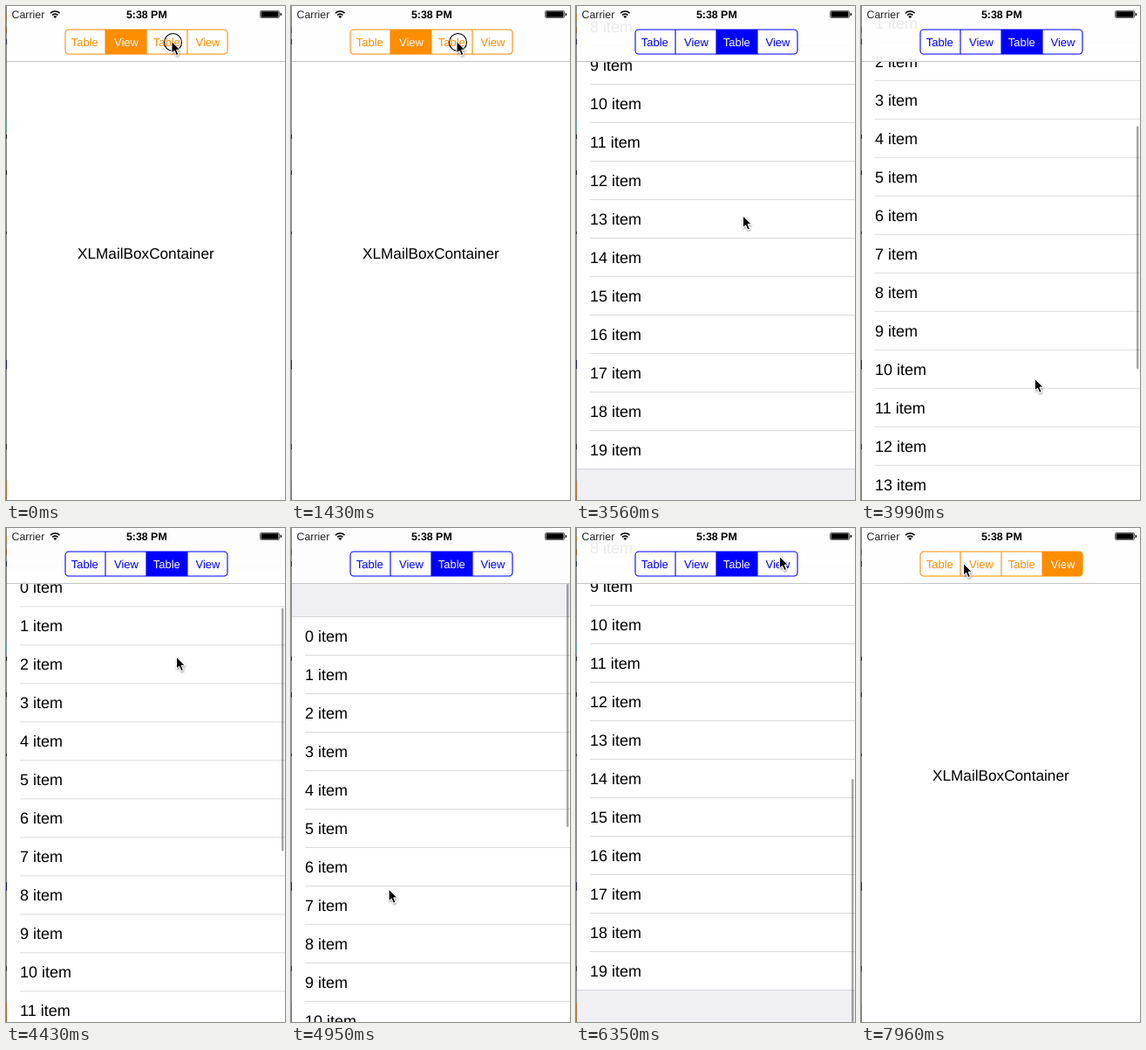
An HTML page for the animation above (8 s loop, 320 px wide and 565 px high).

```html
<!DOCTYPE html>
<html lang="en">
<head>
<meta charset="utf-8">
<title>Mailbox container</title>
<style>
  html, body { margin: 0; width: 100%; height: 100%; overflow: hidden; background: #fff; }
  svg { display: block; width: 100%; height: 100%; }
  text { font-family: "Liberation Sans", Arial, sans-serif; text-rendering: geometricPrecision; }
  .label { font-size: 17.2px; }
  .row { font-size: 18px; }
  .seg { font-size: 13px; text-anchor: middle; }
  .status { font-size: 12.4px; }
</style>
</head>
<body>
<svg viewBox="0 0 320 565">
  <defs>
    <clipPath id="phone"><rect x="1" width="319" height="565"/></clipPath>
    <clipPath id="pill"><rect x="68" y="27" width="186" height="28" rx="4"/></clipPath>
    <filter id="soft" x="-50%" y="-50%" width="220%" height="220%">
      <feDropShadow dx="0.5" dy="1.5" stdDeviation="1" flood-opacity=".4"/>
    </filter>
  </defs>

  <g id="edge"><rect width="1" height="565" fill="#868686"/></g>

  <g clip-path="url(#phone)">
    <rect x="1" width="319" height="565" fill="#fff"/>
    <g id="pages">
      <text class="label" x="82" y="289">XLMailBoxContainer</text>
      <g transform="translate(320 0)">
        <rect x="1" width="319" height="565" fill="#efeff4"/>
        <g id="rows"></g>
        <rect id="bar" x="316" width="2.5" height="278" rx="1.25" fill="#000"/>
      </g>
      <g transform="translate(640 0)">
        <rect x="1" width="319" height="565" fill="#fff"/>
        <text class="label" x="82" y="289">XLMailBoxContainer</text>
      </g>
    </g>

    <rect x="1" width="319" height="63" fill="#fefefe" fill-opacity=".92"/>
    <rect x="1" y="63" width="319" height="1" fill="#c4c4c4"/>
    <g id="tabs"></g>

    <text class="status" x="6.5" y="14" fill="#222">Carrier</text>
    <g fill="none" stroke="#000" stroke-width="1.6">
      <path d="M51 8.2a7.4 7.4 0 0 1 10.6 0M53.1 10.5a4.5 4.5 0 0 1 6.4 0"/>
      <path d="M56.3 14.1l-2-2a2.8 2.8 0 0 1 4 0z" fill="#000" stroke="none"/>
    </g>
    <text class="status" x="161.3" y="14" font-weight="700" text-anchor="middle">5:38 PM</text>
    <rect x="291.5" y="5.5" width="22" height="8" rx="1.5" fill="none" stroke="#000" stroke-width=".6"/>
    <rect x="292.5" y="6.3" width="20" height="6.4" rx=".8"/>
    <path d="M314.6 7.6q1.6.4 1.6 1.9t-1.6 1.9z"/>
  </g>

  <g id="pointer">
    <circle id="press" cx="1.5" cy="1" r="10" fill="none" stroke="#000" stroke-width="1.1"/>
    <path d="M0 0V13.6L3.1 10.7 5.4 16 7.9 14.9 5.6 9.7H9.8Z" stroke="#fff" stroke-width="1" filter="url(#soft)"/>
  </g>
</svg>

<script>
const LOOP = 8000;
const ORANGE = '#ff8d00', BLUE = '#0000ff';
const $ = id => document.getElementById(id);

function add(parent, tag, attrs, text) {
  const el = document.createElementNS('http://www.w3.org/2000/svg', tag);
  for (const k in attrs) el.setAttribute(k, attrs[k]);
  if (text) el.textContent = text;
  parent.appendChild(el);
  return el;
}

// Sliver of the desktop left of the phone: y, height, colour
[[9, 8, '#a8783c'], [24, 7, '#8a5a2a'], [38, 6, '#22227a'], [130, 12, '#6f9a9a'], [147, 5, '#222'],
 [188, 5, '#222'], [258, 3, '#333'], [405, 10, '#1c1c80'], [501, 6, '#333'], [543, 22, '#a86a2a']]
  .forEach(([y, height, fill]) => add($('edge'), 'rect', { y, width: 1, height, fill }));

// Table content, first row at y = 0
const rows = $('rows');
add(rows, 'rect', { x: 1, width: 319, height: 880, fill: '#fff' });
for (let i = 0; i < 20; i++) {
  add(rows, 'text', { class: 'row', x: 16, y: i * 44 + 28 }, i + ' item');
  if (i < 19) add(rows, 'rect', { x: 16, y: i * 44 + 43, width: 304, height: 1, fill: '#dbdbde' });
}
[-1, 879].forEach(y => add(rows, 'rect', { x: 1, y, width: 319, height: 1, fill: '#d6d6da' }));

// Segmented control
const edges = [68, 114, 161, 208, 254];
const tabs = $('tabs');
const fills = add(tabs, 'g', { 'clip-path': 'url(#pill)' });
const segs = ['Table', 'View', 'Table', 'View'].map((name, i) => ({
  fill: add(fills, 'rect', { x: edges[i], y: 27, width: edges[i + 1] - edges[i], height: 28 }),
  text: add(tabs, 'text', { class: 'seg', x: [90.3, 138, 184.3, 231.5][i], y: 45.5 }, name)
}));
const frame = add(tabs, 'path', {
  d: 'M72 27H250a4 4 0 0 1 4 4V51a4 4 0 0 1-4 4H72a4 4 0 0 1-4-4V31a4 4 0 0 1 4-4zM114 27V55M161 27V55M208 27V55',
  fill: 'none', 'stroke-width': 1.1
});

const out = p => 1 - (1 - p) ** 2;
const inOut = p => p * p * (3 - 2 * p);

// Each step: time, value or values, easing towards it
const scroll = [[2040, 0], [2250, 235], [2480, 452, out], [3600, 452], [3850, 217], [4430, 56, out],
  [4750, 0, out], [5100, 0], [5400, 235], [5570, 312], [6200, 452, out], [6350, 453], [6480, 452]];
const barAlpha = [[2040, 0], [2060, 1], [2700, 1], [3010, 0], [3600, 0], [3640, 1], [6620, 1], [6860, 0]];
const page = [[1660, 0], [1980, 1, inOut], [6850, 1], [7150, 2, inOut]];
const pointer = [[1690, [190, 40.5]], [2030, [165, 295], inOut], [2250, [130, 60]], [2480, [122.5, 33], out],
  [2690, [122.5, 33]], [3020, [150, 72], inOut], [3140, [150, 72]], [3560, [191.5, 240], inOut],
  [3600, [191.5, 240]], [3850, [200, 475]], [4430, [195.5, 147.5], inOut], [4480, [195.5, 147.5]],
  [5000, [110, 420], inOut], [5100, [110, 420]], [5400, [5, 185]], [5480, [-20, 130]], [5830, [-20, 20]],
  [5960, [15, 2]], [6130, [35, 18]], [6350, [233.5, 32.5], inOut], [6620, [232, 41], inOut],
  [6880, [232, 41]], [7160, [181.5, 37], inOut], [7350, [181.5, 37]], [7780, [116.8, 40], out],
  [7950, [116.8, 40]], [7960, [117.5, 40.5]]];
const presses = [[0, 90], [1430, 1520], [2040, 2250], [3600, 3850], [5100, 5400], [6710, 6800]];

function at(steps, t) {
  const n = steps.findIndex(s => s[0] > t);
  if (n === 0) return steps[0][1];
  if (n < 0) return steps[steps.length - 1][1];
  const [t0, a] = steps[n - 1], [t1, b, ease] = steps[n];
  let p = (t - t0) / (t1 - t0);
  if (ease) p = ease(p);
  return Array.isArray(a) ? a.map((v, i) => v + (b[i] - v) * p) : a + (b - a) * p;
}

const within = (t, a, b) => t >= a && t < b;
const move = (el, x, y) => el.setAttribute('transform', `translate(${x.toFixed(2)} ${y.toFixed(2)})`);

function paintTabs(t) {
  const chosen = t < 1690 ? 1 : t < 6880 ? 2 : 3;
  const held = within(t, 1520, 1690) ? 2 : within(t, 6800, 6880) ? 3 : -1;
  const tint = chosen === 2 ? BLUE : ORANGE;
  segs.forEach(({ fill, text }, i) => {
    fill.setAttribute('fill', tint);
    fill.setAttribute('fill-opacity', i === chosen ? 1 : i === held ? 0.15 : 0);
    text.setAttribute('fill', i === chosen ? '#fff' : tint);
  });
  frame.setAttribute('stroke', tint);
}

function draw(t) {
  const s = at(scroll, t);
  move($('pages'), -320 * at(page, t), 0);
  move(rows, 0, 102 - s);
  $('bar').setAttribute('y', 64 + Math.min(s, 452) * 223 / 452);
  $('bar').setAttribute('fill-opacity', 0.35 * at(barAlpha, t));
  paintTabs(t);
  move($('pointer'), ...at(pointer, t));
  $('press').setAttribute('visibility', presses.some(([a, b]) => within(t, a, b)) ? 'visible' : 'hidden');
}

const start = performance.now();
function tick() {
  draw((performance.now() - start) % LOOP);
  requestAnimationFrame(tick);
}
tick();
</script>
</body>
</html>
```
